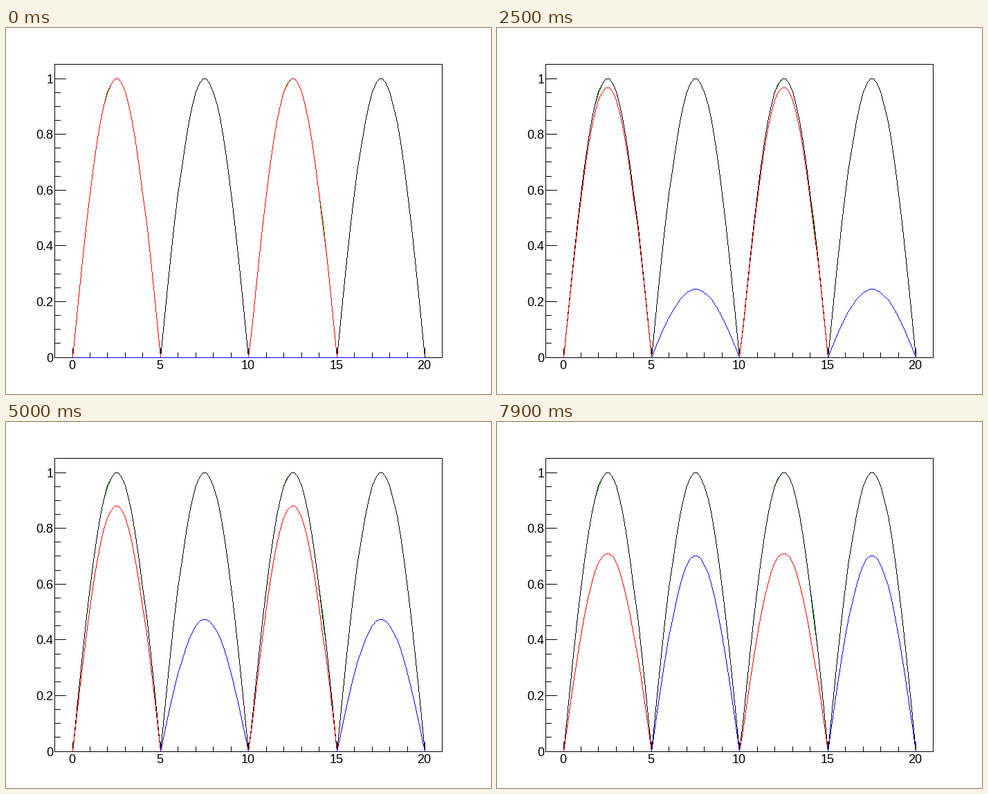
Write a matplotlib script that moves like this. It is 701 px wide and 529 px high and loops after 8000 ms.

```python
import numpy as np
import matplotlib.pyplot as plt
from matplotlib.animation import FuncAnimation

W, H, DPI = 701, 529, 64
PX = 72 / DPI                  # one pixel in points
FRAMES, STEP = 80, 0.00987     # mixing angle grows by STEP per frame

LEFT, RIGHT, TOP, BOTTOM = 70, 630, 52, 476
BLACK, GREEN, RED, BLUE = (0, 0, 0), (0, 180, 0), (255, 0, 0), (0, 0, 255)


def to_x(v):
    return np.floor(96.01 + 0.8 * W / 22 * v).astype(int)


def to_y(v):
    return np.floor(0.9 * H - 0.8 * H / 1.05 * v).astype(int)


fig = plt.figure(figsize=(W / DPI, H / DPI), dpi=DPI, facecolor="white")
ax = fig.add_axes([0, 0, 1, 1])
ax.axis("off")


def line(xs, ys):
    ax.plot(xs, ys, color="black", lw=PX, antialiased=False, snap=False,
            solid_capstyle="projecting", zorder=2)


def label(x, y, value, align):
    ax.text(x, y, f"{value:g}", ha=align, va="baseline",
            family="Liberation Sans", size=18 * PX)


# frame, ticks and labels
line([LEFT, RIGHT, RIGHT, LEFT, LEFT], [TOP, TOP, BOTTOM, BOTTOM, TOP])

for i in range(21):
    x = to_x(np.float64(i))
    major = i % 5 == 0
    line([x, x], [BOTTOM, BOTTOM - (13 if major else 7)])
    if major:
        label(x - 1.3, 492.5, i, "center")

for i in range(21):
    y = to_y(np.float64(i / 20))
    major = i % 4 == 0
    line([LEFT, LEFT + (16 if major else 8)], [y, y])
    if major:
        label(67.7, y + 6.5, i / 20, "right")


def stroke(img, xs, ys, color):
    """Draw a one pixel wide polyline, leaving out parts below the axis."""
    px, py = to_x(xs), to_y(ys)
    for i in range(len(px) - 1):
        if min(ys[i], ys[i + 1]) < -1e-9:
            continue
        n = max(abs(px[i + 1] - px[i]), abs(py[i + 1] - py[i])) + 1
        cols = np.rint(np.linspace(px[i], px[i + 1], n)).astype(int)
        rows = np.rint(np.linspace(py[i], py[i + 1], n)).astype(int)
        img[rows, cols] = (*color, 255)


# wave and its two rotating components
xs = np.linspace(0, 20, 101)
wave = np.sin(np.pi * xs / 5)

base = np.zeros((H, W, 4), np.uint8)
stroke(base, xs + 0.001, np.abs(wave), GREEN)
stroke(base, xs, np.abs(wave), BLACK)

curves = ax.imshow(base, extent=(-0.5, W - 0.5, H - 0.5, -0.5),
                   aspect="auto", interpolation="nearest", zorder=5)
ax.set_xlim(-0.5, W - 0.5)
ax.set_ylim(H - 0.5, -0.5)


def update(n):
    angle = n * STEP
    img = base.copy()
    stroke(img, xs, np.cos(angle) * wave, RED)
    stroke(img, xs, -np.sin(angle) * wave, BLUE)
    curves.set_data(img)
    return [curves]


anim = FuncAnimation(fig, update, frames=FRAMES, interval=100,
                     repeat=True, repeat_delay=0, blit=False)
plt.show()
```
